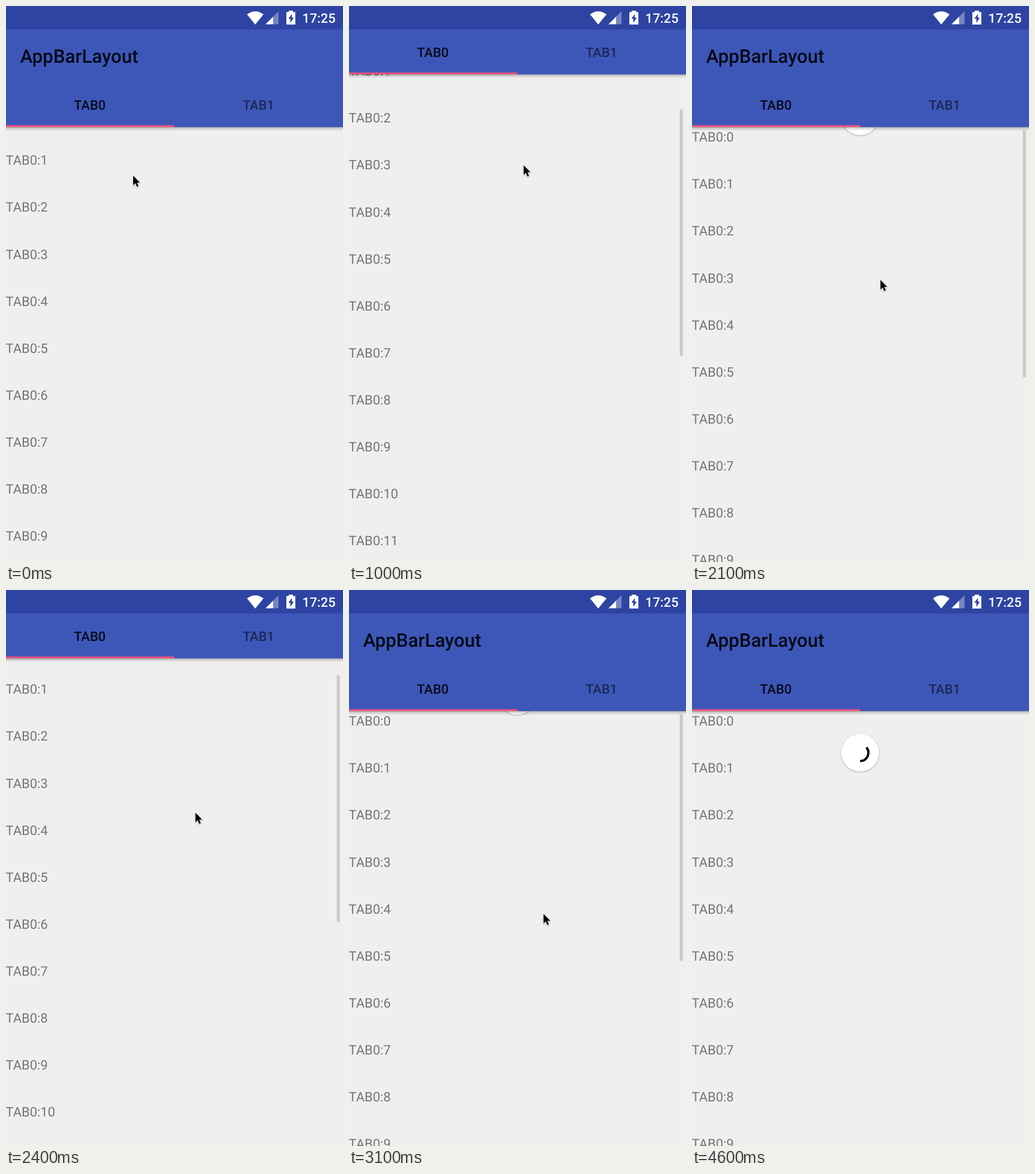
An HTML page for the animation above (4700 ms loop, 583 by 960 pixels).

```html
<!DOCTYPE html>
<html lang="en">
<head>
<meta charset="utf-8">
<title>AppBarLayout</title>
<style>
  html, body { margin: 0; width: 100%; height: 100%; overflow: hidden; background: #efefef; }
  svg { display: block; width: 583px; height: 960px; }
  text { font-family: Roboto, sans-serif; font-size: 22.7px; text-rendering: geometricPrecision; }
  .medium { font-weight: 500; }
  .item { fill: #757575; }
  #spinner { filter: drop-shadow(0 1.5px 1.5px rgba(0, 0, 0, .28)); }
  #cursor { filter: drop-shadow(0 1px 1px rgba(0, 0, 0, .3)); }
</style>
</head>
<body>
<svg viewBox="0 0 583 960" xmlns="http://www.w3.org/2000/svg">
  <defs>
    <linearGradient id="shade" x1="0" y1="0" x2="0" y2="1">
      <stop offset="0" stop-color="#000" stop-opacity=".32"/>
      <stop offset=".4" stop-color="#000" stop-opacity=".12"/>
      <stop offset="1" stop-color="#000" stop-opacity="0"/>
    </linearGradient>
  </defs>
  <rect width="583" height="960" fill="#efefef"/>
  <g id="list"></g>
  <rect id="thumb" x="572.3" width="5.2" height="426" fill="#cacaca"/>
  <g id="spinner">
    <circle r="32.6" fill="#fff"/>
    <path id="arc" fill="none" stroke="#000" stroke-width="4"/>
  </g>
  <!-- y = 0 is the lower edge of the bar -->
  <g id="bar">
    <rect width="583" height="7" fill="url(#shade)"/>
    <rect y="-210" width="583" height="210" fill="#3d57b9"/>
    <text class="medium" x="24.5" y="-110.6" fill-opacity=".88" style="font-size:32.4px">AppBarLayout</text>
    <text class="medium" x="145" y="-30.3" fill-opacity=".88" text-anchor="middle">TAB0</text>
    <text class="medium" x="436.8" y="-30.3" fill-opacity=".54" text-anchor="middle">TAB1</text>
    <rect y="-3.2" width="291" height="3.2" fill="#f2527c"/>
  </g>
  <rect width="583" height="40.5" fill="#2e44a3"/>
  <g fill="#fff">
    <path d="M417 14.5Q431 4 445.5 14.5L431.2 32Z"/>
    <path d="M471.5 9V31.5H449Z" fill-opacity=".35"/>
    <path d="M462 18.5V31.5H449Z"/>
    <path d="M489 8h7.5v2.5h4v21.5h-15.5v-21.5h4Z"/>
    <path d="M494.5 13.5l-6 8.5h3.5v7l6-8.8h-3.5Z" fill="#2e44a3"/>
    <text class="medium" x="512.5" y="29">17:25</text>
  </g>
  <path id="cursor" d="M0 0V16.6L3.9 13 6.6 19.3 9.3 18.1 6.6 12H11.8Z" stroke="#fff" stroke-width="1.4" paint-order="stroke"/>
</svg>
<script>
const LOOP = 4700, STEP = 100, PITCH = 81.1;
const OPEN = 209, SHUT = 118;

// Start values, then moves: [from ms, to ms, ...new values], each eased in and out.
const pointer = {
  start: [220, 293],
  moves: [
    [200, 400, 306.5, 475.5], [600, 1050, 302, 268], [1100, 1692, 322, 473],
    [1980, 2100, 326, 473], [2100, 2500, 328, 368], [2500, 3547, 342, 682],
    [3750, 4300, 430, -40]
  ]
};
const swipe = {
  start: [0],
  moves: [[766, 1166, -246], [1200, 1793, 88], [2100, 2550, -159], [2600, 3547, 269]]
};
const ring = { // start angle, sweep
  start: [-60, 0],
  moves: [[3100, 3550, 115, 313], [3650, 4380, 625, 18], [4380, 4600, 680, 130]]
};
const thumbFade = { start: [0], moves: [[700, 800, 1], [3800, 4200, 0]] };

function ease(t, from, to) {
  const u = Math.min(1, Math.max(0, (t - from) / (to - from)));
  return u * u * (3 - 2 * u);
}

const at = (track, t) => track.moves.reduce(
  (now, [from, to, ...next]) => now.map((v, i) => v + (next[i] - v) * ease(t, from, to)),
  track.start);

// Swiping up takes from the spinner, the bar, then the list; down opens the bar first.
function layout(t) {
  let edge = OPEN, scroll = 41, pull = 0;
  for (let k = STEP; k <= t; k += STEP) {
    let dy = at(swipe, k)[0] - at(swipe, k - STEP)[0];
    if (dy < 0) {
      const back = Math.min(pull, -dy);
      pull -= back;
      dy += back;
    }
    const moved = Math.min(OPEN, Math.max(SHUT, edge + dy)) - edge;
    edge += moved;
    scroll -= dy - moved;
    pull += Math.max(0, -scroll);
    scroll = Math.max(0, scroll);
  }
  return { edge, scroll, pull };
}

const el = id => document.getElementById(id);
const move = (id, x, y) => el(id).setAttribute("transform", `translate(${x} ${y})`);

for (let n = 0; n < 16; n++) {
  const row = document.createElementNS("http://www.w3.org/2000/svg", "text");
  row.setAttribute("class", "item");
  row.setAttribute("x", -0.4);
  row.setAttribute("y", 25.2 + n * PITCH);
  row.textContent = "TAB0:" + n;
  el("list").append(row);
}

function arcPath([start, sweep], r = 14.3) {
  const point = deg => {
    const a = deg * Math.PI / 180;
    return `${r * Math.cos(a)} ${r * Math.sin(a)}`;
  };
  return `M${point(start)}A${r} ${r} 0 ${sweep > 180 ? 1 : 0} 1 ${point(start + sweep)}`;
}

function draw(t) {
  const { edge, scroll, pull } = layout(t);
  move("bar", 0, edge);
  move("list", 0, edge - scroll);
  move("thumb", 0, edge + 5.7 + scroll * 0.525);
  el("thumb").setAttribute("opacity", at(thumbFade, t)[0]);
  move("spinner", 290.8, edge - 42 + pull / 2);
  el("arc").setAttribute("d", arcPath(at(ring, t)));
  move("cursor", ...at(pointer, t));
}

const begin = performance.now();
function tick() {
  const t = (performance.now() - begin) % LOOP;
  draw(Math.floor(t / STEP) * STEP);
  requestAnimationFrame(tick);
}
tick();
</script>
</body>
</html>
```
